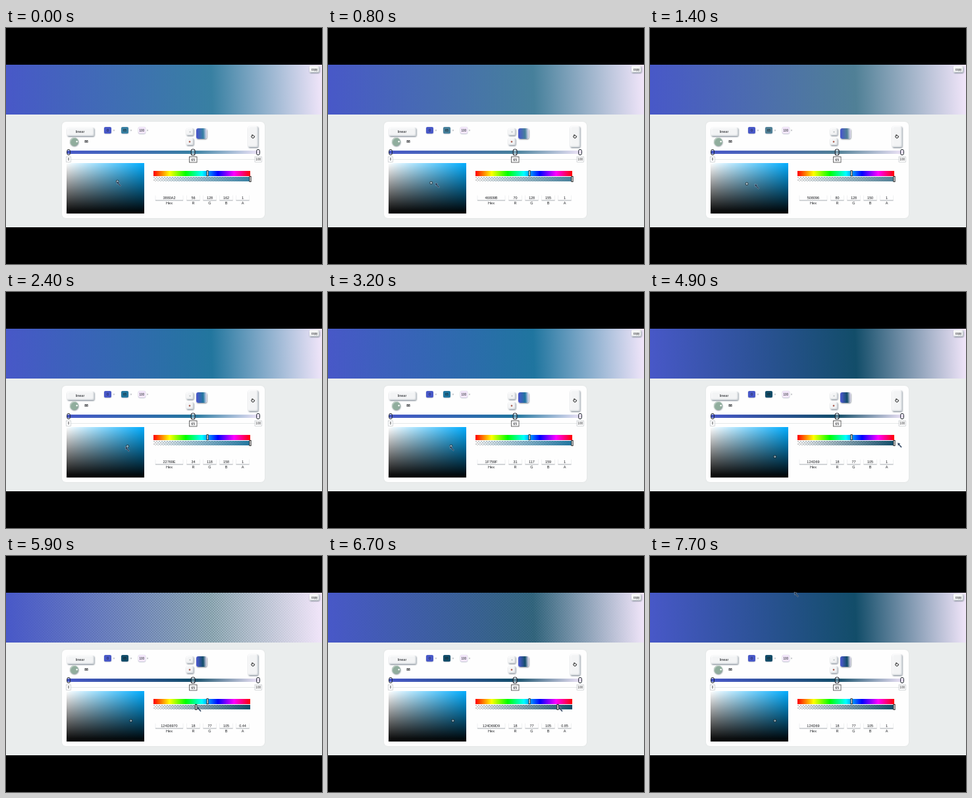
An HTML page that plays this animation: 480x360 px, repeating every 8000 ms.

```html
<!DOCTYPE html>
<html lang="en">
<head>
<meta charset="utf-8">
<title>Gradient picker</title>
<style>
  html, body { margin: 0; width: 100%; height: 100%; overflow: hidden; background: #000; }
  #stage {
    --from: #4858c8; --to: #f2e6fa; --mid: rgb(56 128 162); --midA: var(--mid);
    position: relative; width: 480px; height: 360px; overflow: hidden; background: #000;
  }
  #stage > * { position: absolute; box-sizing: border-box; }
  .page { left: 0; top: 56px; width: 480px; height: 248px; background: #eaeded; }
  .banner {
    left: 0; top: 56px; width: 480px; height: 76px;
    background: linear-gradient(88deg, var(--from), var(--midA) 65%, var(--to)),
                repeating-conic-gradient(#fff 0 25%, #d4d4d0 0 50%) 0 0 / 4px 4px;
  }
  .card { left: 85px; top: 143px; width: 308px; height: 147px; border-radius: 6px; background: #fefefe; box-shadow: 0 0 2px #d8dcdc; }
  .button { border-radius: 2px; background: #f3f4f5; box-shadow: .5px 1px 2px #7d8791, inset -1px -1px 2px #c3c9ce, inset 1px 1px 1px #fff; }
  .chip { width: 11px; height: 10px; top: 151px; border-radius: 2px; box-shadow: 0 .5px 1.5px #9aa2b4; }
  .track { left: 92px; top: 187px; width: 294px; height: 5px; border-radius: 3px; background: linear-gradient(90deg, var(--from), var(--mid) 65%, var(--to)); }
  .swatch { left: 289px; top: 153px; width: 16px; height: 16px; border-radius: 3px; background: linear-gradient(88deg, var(--from) 10%, var(--mid) 65%, var(--to)); box-shadow: .5px 1px 2px #7d8791; }
  .dial { left: 97px; top: 167px; width: 13px; height: 13px; border-radius: 50%; background: #90ad9d; box-shadow: .5px 1px 2px #8b959b, inset 1px 1px 1px #c6d4cc; }
  .field { left: 92px; top: 206px; width: 118px; height: 77px; background: linear-gradient(transparent, #000), linear-gradient(90deg, #fff, hsl(199.3 100% 50%)); }
  .hue { left: 224px; top: 218px; width: 147px; height: 7.5px; background: linear-gradient(90deg, red, #ff0, lime, cyan, blue, #f0f, red); }
  .alpha {
    left: 224px; top: 227px; width: 147px; height: 7px;
    background: linear-gradient(90deg, transparent, var(--mid)),
                repeating-conic-gradient(#fff 0 25%, #ccc 0 50%) 0 0 / 4px 4px;
  }
  svg { left: 0; top: 0; }
  text { font: 5.5px "Liberation Sans", Arial, sans-serif; text-anchor: middle; fill: #16181c; }
  .small { font-size: 4.6px; }
  .faint { fill: #8d9298; font-size: 5px; }
</style>
</head>
<body>
<div id="stage">
  <div class="page"></div>
  <div class="banner"></div>
  <div class="button" style="left:461px;top:58px;width:15px;height:10px"></div>
  <div class="card"></div>
  <div class="button" style="left:93px;top:152px;width:41px;height:13px"></div>
  <div class="chip" style="left:149px;background:var(--from)"></div>
  <div class="chip" style="left:175px;background:var(--mid)"></div>
  <div class="chip" style="left:201px;background:var(--to)"></div>
  <div class="button" style="left:274px;top:153px;width:11px;height:11px"></div>
  <div class="button" style="left:274px;top:168px;width:11px;height:11px"></div>
  <div class="button" style="left:368px;top:150px;width:15px;height:32px"></div>
  <div class="swatch"></div>
  <div class="dial"></div>
  <div class="track"></div>
  <div class="field"></div>
  <div class="hue"></div>
  <div class="alpha"></div>

  <svg width="480" height="360" viewBox="0 0 480 360">
    <text class="small" x="468.5" y="64.5">copy</text>
    <text x="112.5" y="160.2">linear</text>
    <text class="small" x="154.5" y="157.8">0</text>
    <text class="small" x="180.5" y="157.8">65</text>
    <text class="small" x="206.3" y="157.8">100</text>
    <g class="marks">
      <text class="faint" x="164" y="157.5">×</text>
      <text class="faint" x="190" y="157.5">×</text>
      <text class="faint" x="215" y="157.5">×</text>
      <text class="faint" x="279.5" y="160">+</text>
    </g>
    <circle cx="279" cy="173.5" r="1.3" fill="#a8584c"/>
    <circle cx="107.7" cy="173.2" r="1.2" fill="#fff"/>
    <text x="122" y="175.2" font-weight="bold" style="font-weight:bold;font-size:5px">88</text>
    <g fill="none" stroke="#111" stroke-width="1">
      <path d="M373.7 163.8A2.3 2.3 0 1 0 377 164.3M373.2 163.2h2v2"/>
    </g>

    <path d="M92 200.5H386" stroke="#dfe2e4" stroke-width=".8"/>
    <g stroke="#b9bec2" stroke-width=".6" fill="#fff">
      <rect x="91.5" y="196.5" width="7" height="8"/>
      <rect x="378" y="196.5" width="10.5" height="8"/>
      <rect x="278.5" y="196.5" width="11.5" height="8.5" stroke="#555" stroke-width=".9"/>
    </g>
    <text class="small" x="95" y="202.4">0</text>
    <text x="284.2" y="202.8">65</text>
    <text class="small" x="383.2" y="202.4">100</text>

    <g fill="none" stroke="#20262f">
      <rect x="92.8" y="185.3" width="4.6" height="8.4" rx="2.3"/>
      <rect x="380.6" y="185.3" width="4.8" height="8.4" rx="2.4"/>
      <rect x="281.3" y="185" width="5.6" height="9" rx="2" stroke-width="1.1"/>
      <rect x="283" y="186.6" width="2.2" height="5.8" stroke="#e9f1f4" stroke-width=".7"/>
    </g>
    <rect x="305" y="217.7" width="2.2" height="8" fill="#fff" stroke="#111" stroke-width=".9"/>
    <rect id="alphaHandle" x="-1.1" y="226.4" width="2.2" height="8" fill="#fff" stroke="#111" stroke-width=".9"/>

    <g id="fields"></g>
    <g id="dot" fill="none">
      <circle r="1.9" stroke="#111" stroke-width=".8"/>
      <circle r="1.1" stroke="#fff" stroke-width=".7"/>
    </g>
    <path id="cursor" d="M0 0L4.2 1.2 2.9 2.4 6.6 6.3 5.3 7.4 1.9 3.4.9 4.4Z" fill="#23364f" stroke="#b9c9dc" stroke-width=".4"/>
  </svg>
</div>
<script>
  const LOOP = 8000, STEP = 100, LAST = 7700;

  // Each key: time, then the values reached at that time.
  const colorKeys = [
    [0, 56, 128, 162], [1400, 80, 128, 150], [2400, 34, 118, 158],
    [3900, 28, 117, 160], [4600, 18, 77, 105]
  ];
  const alphaKeys = [[5000, 1], [5900, .44], [6200, .4], [6900, 1]];
  const cursorKeys = [
    [0, 168, 234], [1400, 159, 238], [2400, 181, 236], [3900, 188, 234],
    [4600, 189, 251], [4900, 376, 230], [5000, 371, 230], [5900, 290, 230],
    [6200, 284, 230], [6900, 371, 230], [7300, 330, 150], [7700, 219, 55]
  ];

  const $ = id => document.getElementById(id);
  const stage = $("stage");

  function sample(keys, t) {
    const next = keys.findIndex(key => key[0] > t);
    if (next === 0) return keys[0].slice(1);
    if (next < 0) return keys.at(-1).slice(1);
    const a = keys[next - 1], b = keys[next];
    const p = (t - a[0]) / (b[0] - a[0]);
    const eased = p * .5 + p * p * (3 - 2 * p) * .5;
    return a.slice(1).map((v, i) => v + (b[i + 1] - v) * eased);
  }

  function addField(label, x, width) {
    $("fields").insertAdjacentHTML("beforeend",
      `<path d="M${x - width / 2} 255.5V263H${x + width / 2}V255.5" fill="none" stroke="#e4e6e8" stroke-width=".6"/>
       <path d="M${x - width / 2} 263h${width}" stroke="#8e9398" stroke-width=".7"/>
       <text x="${x}" y="261"></text><text x="${x}" y="269.3">${label}</text>`);
    return $("fields").querySelector("text:nth-last-of-type(2)");
  }
  const outputs = [["Hex", 248, 42], ["R", 284.5, 20], ["G", 309.5, 20], ["B", 334.5, 20], ["A", 359.5, 20]]
    .map(args => addField(...args));

  const hex = n => Math.round(n).toString(16).padStart(2, "0").toUpperCase();
  const place = (id, x, y) => $(id).setAttribute("transform", `translate(${x} ${y})`);

  function draw(t) {
    const rgb = sample(colorKeys, t).map(Math.round);
    const alpha = Math.round(sample(alphaKeys, t)[0] * 100) / 100;
    const max = Math.max(...rgb), saturation = 1 - Math.min(...rgb) / max;

    stage.style.setProperty("--mid", `rgb(${rgb.join(" ")})`);
    stage.style.setProperty("--midA", `rgb(${rgb.join(" ")} / ${alpha})`);
    place("dot", 92 + 118 * saturation, 206 + 77 * (1 - max / 255));
    place("alphaHandle", 224 + 147 * alpha, 0);
    place("cursor", ...sample(cursorKeys, t));

    const code = rgb.map(hex).join("") + (alpha < 1 ? hex(alpha * 255) : "");
    [code, ...rgb, alpha].forEach((value, i) => { outputs[i].textContent = value; });
  }

  const start = performance.now();
  function tick() {
    const t = (performance.now() - start) % LOOP;
    draw(Math.min(LAST, Math.floor(t / STEP) * STEP));
    requestAnimationFrame(tick);
  }
  tick();
</script>
</body>
</html>
```
